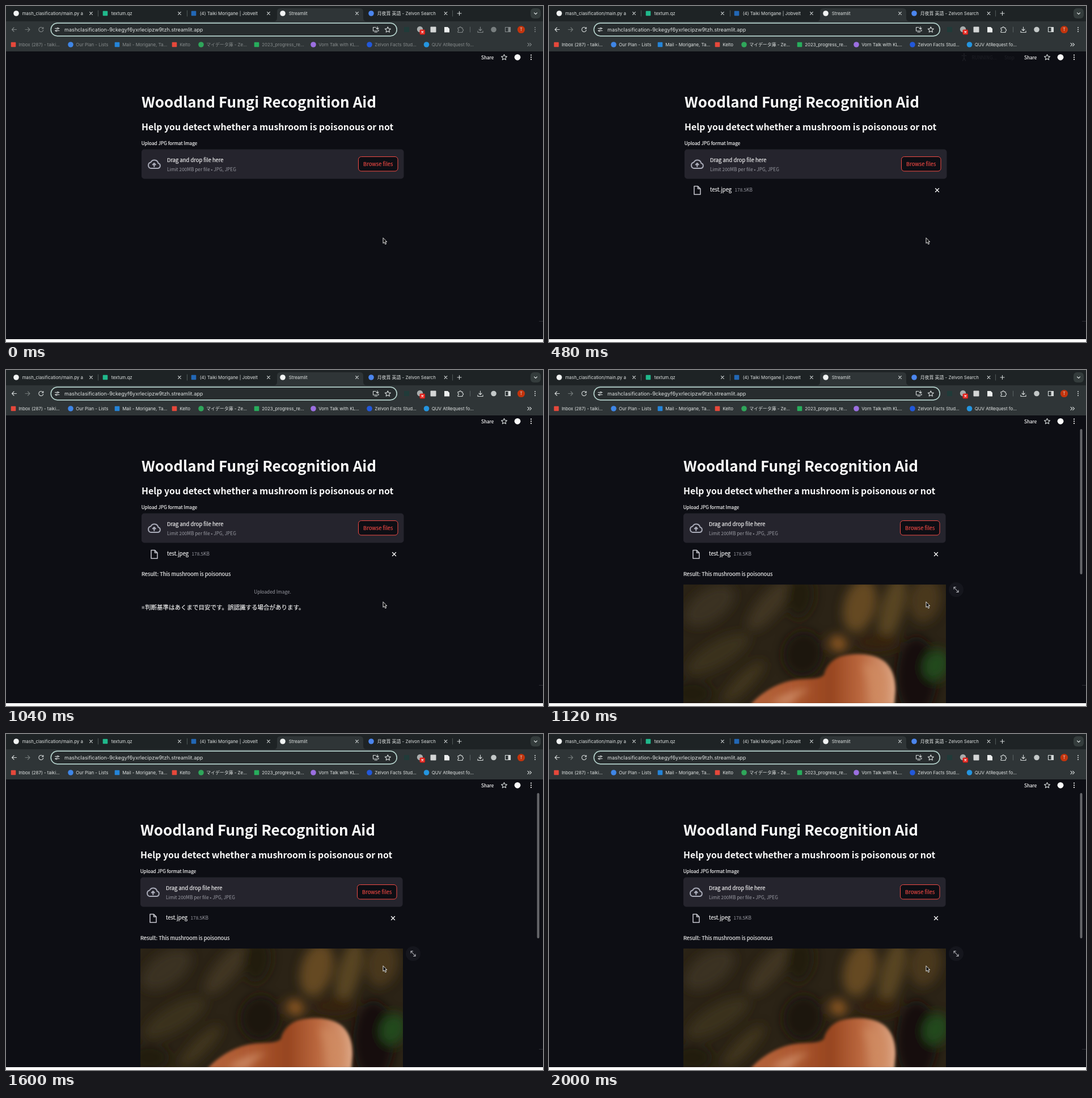
An HTML page for the animation above (2080 ms loop, 947 by 592 pixels).

```html
<!DOCTYPE html>
<html lang="en">
<head>
<meta charset="utf-8">
<title>Upload demo</title>
<style>
html, body { margin: 0; width: 100%; height: 100%; overflow: hidden; background: #fff; }
svg { display: block; }
text { white-space: pre; }
.ui { font: 7.9px Inter, "Noto Sans CJK JP", sans-serif; fill: #dfe3e2; }
.page { font: 9.4px "Noto Sans CJK JP", "Noto Sans CJK", sans-serif; fill: #fafafa; }
.page text { stroke: #fafafa; stroke-width: .15; }
.line { fill: none; stroke: #d5dada; stroke-width: 1.1; stroke-linecap: round; stroke-linejoin: round; }
.small { font-size: 8.24px; }
.page .grey { fill: #9a9ba3; stroke: none; }
.page .bold { font-weight: 700; stroke: none; }
.page .red { fill: #f04a45; stroke: #f04a45; }
</style>
</head>
<body>
<svg width="947" height="592" viewBox="0 0 947 592">
  <defs>
    <clipPath id="photoBox"><rect x="239" y="378" width="463" height="209"/></clipPath>
    <filter id="soft" x="-60%" y="-60%" width="220%" height="220%"><feGaussianBlur stdDeviation="9"/></filter>
    <filter id="edge"><feGaussianBlur stdDeviation="2.5"/></filter>
    <filter id="glow" x="-40%" y="-40%" width="180%" height="180%"><feGaussianBlur stdDeviation="7"/></filter>
    <linearGradient id="cap">
      <stop offset="0" stop-color="#b4643c"/>
      <stop offset=".3" stop-color="#ac572f"/>
      <stop offset=".55" stop-color="#97451f"/>
      <stop offset=".75" stop-color="#b9663d"/>
      <stop offset="1" stop-color="#dda684"/>
    </linearGradient>
  </defs>

  <!-- browser frame -->
  <rect width="947" height="80" fill="#1e2325"/>
  <path d="M472 27q6 0 6-6v-11q0-6 6-6h140q6 0 6 6v11q0 6 6 6z" fill="#2f3537"/>
  <rect y="27" width="947" height="53" fill="#2f3537"/>
  <g id="tabs" class="ui"></g>
  <path class="line" d="M162.500 8v10M319.500 8v10M787.500 8v10" style="stroke:#4d5656"/>
  <path class="line" d="M796 13h7M799.500 9.500v7"/>
  <rect x="925" y="4" width="18" height="18" rx="6" fill="#343c3c"/>
  <path class="line" d="M931.500 12l2.500 2.500 2.500-2.500"/>

  <rect x="79.200" y="30.200" width="610" height="22.600" rx="11.300" fill="#272c2e" stroke="#b3d0ca" stroke-width="1.700"/>
  <g class="line">
    <path d="M86.500 39.500h3M93 39.500h1M86.500 43.500h1M91 43.500h3"/>
    <circle cx="91.300" cy="39.500" r="1.300"/><circle cx="88.800" cy="43.500" r="1.300"/>
    <path d="M652 37.500h-4.500v6.500h9.500v-2M650 46h4.500M655 36.500v4M653 39l2 2 2-2"/>
    <path id="star" d="M673.300 36.700l1.500 3.200 3.500.400-2.600 2.400.700 3.400-3.100-1.700-3.100 1.700.700-3.400-2.600-2.400 3.500-.400z"/>
    <path d="M34 41.500h8M38.500 38l3.500 3.500-3.500 3.500" style="stroke:#727979"/>
  </g>
  <text class="ui" x="103" y="44.800" style="font-size:9.150px">mashclasification-9ckegyf6yxrlecipzw9tzh.streamlit.app</text>

  <rect x="702" y="37" width="9" height="9" fill="#203b39"/>
  <circle cx="730" cy="41" r="5.200" fill="#a9adad"/>
  <rect x="729.500" y="41.500" width="9.500" height="9" rx="2" fill="#e0231c"/>
  <path class="line" d="M732.800 44.500l3 3M735.800 44.500l-3 3" style="stroke:#fff"/>
  <rect x="748.500" y="36.500" width="10" height="10" rx="1" fill="#d4d6d6"/>
  <path d="M773 37h6l3 3v6.500h-9z" fill="#eceeee"/>
  <path class="line" d="M818.500 37v9" style="stroke:#596262"/>
  <circle cx="908.500" cy="41.500" r="6.600" fill="#c3340d"/>
  <text class="ui" x="908.500" y="44" text-anchor="middle" style="font-size:7px">T</text>

  <g id="active">
    <g class="line">
      <path d="M18.500 41.500h-8M14 38l-3.500 3.500 3.500 3.500"/>
      <path d="M65.300 39.500a4 4 0 1 0 .400 3M65.800 37.500v2.500h-2.500"/>
      <path d="M797 38.500h2.500a1.600 1.600 0 0 1 3.200 0h2.300v2.500a1.600 1.600 0 0 1 0 3.200v2.300h-8v-2.500a1.500 1.500 0 0 0 0-3z"/>
      <path d="M836.500 37v6M834 41l2.500 2.500 2.500-2.500M832 44v2.500h9v-2.500"/>
      <rect x="880.500" y="37.500" width="9" height="8"/>
    </g>
    <rect x="885.500" y="37.500" width="4" height="8" fill="#d5dada"/>
    <circle cx="860" cy="41.500" r="4.800" fill="#c3c8c8"/>
    <g fill="#d5dada"><circle cx="933" cy="38" r="1"/><circle cx="933" cy="41.500" r="1"/><circle cx="933" cy="45" r="1"/></g>
    <g id="marks" class="ui"></g>
    <path class="line" d="M920 65.300l2.700 2.700-2.700 2.700M923.700 65.300l2.700 2.700-2.700 2.700"/>
  </g>
  <g id="markIcons"></g>

  <!-- page -->
  <rect y="80" width="947" height="507" fill="#0d0e14"/>
  <g class="page">
    <text class="small" x="838" y="93.500">Share</text>
    <use href="#star" class="line" transform="translate(205.200 48.700)"/>
    <circle cx="902" cy="90.300" r="5.400"/>
    <circle cx="926" cy="86.500" r="1.100"/><circle cx="926" cy="90.300" r="1.100"/><circle cx="926" cy="94.100" r="1.100"/>
    <g id="running">
      <g class="line" style="stroke:#a5a6ad"><path d="M728 87.500h8M732 87.500v4l-2.500 5M732 91.500l2.500 5"/><circle cx="732" cy="84.700" r=".700"/></g>
      <text class="small grey" x="745.500" y="93.500">RUNNING...</text>
      <text class="small grey" x="803" y="93.500">Stop</text>
    </g>
  </g>
  <path d="M940 555.500h7" stroke="#2d2e34"/>

  <g id="column" class="page">
    <text class="bold" x="239" y="178.500" style="font-size:26px">Woodland Fungi Recognition Aid</text>
    <text class="bold" x="239" y="218.700" style="font-size:15.850px">Help you detect whether a mushroom is poisonous or not</text>
    <text class="small" x="238.700" y="245">Upload JPG format Image</text>
    <rect x="239" y="252.500" width="462.500" height="52" rx="5" fill="#25242d"/>
    <g class="line" style="stroke:#a9abb8;stroke-width:2">
      <path d="M255.500 286a5.300 5.300 0 0 1-.300-10.400 7 7 0 0 1 13.200 1.400 4.600 4.600 0 0 1-.400 9z"/>
      <path d="M261.300 283v-4M258.800 279.500l2.500-2.500 2.500 2.500z"/>
    </g>
    <text x="284" y="274.800">Drag and drop file here</text>
    <text class="small grey" x="284" y="291.200">Limit 200MB per file • JPG, JPEG</text>
    <rect x="621.500" y="265.500" width="69.500" height="25.500" rx="5" fill="#0d0e14" stroke="#f04a45"/>
    <text class="red" x="656.200" y="281.700" text-anchor="middle">Browse files</text>

    <g id="file">
      <path class="line" d="M256 317.500h6.500l4.500 4.500v10h-11zM262.500 317.500v4.500h4.500" style="stroke:#c7c8cf;stroke-width:1.500"/>
      <text x="284" y="327.300">test.jpeg</text>
      <text class="small grey" x="327.500" y="327.300">178.5KB</text>
      <path class="line" d="M681.500 321.500l6 6M687.500 321.500l-6 6" style="stroke:#fafafa;stroke-width:1.400"/>
    </g>
    <g id="result">
      <text x="239" y="362.500">Result: This mushroom is poisonous</text>
      <g id="caption">
        <text class="small grey" x="470" y="394" text-anchor="middle">Uploaded Image.</text>
        <text x="238.500" y="420.500" style="font-size:6.500px">※</text>
        <text x="245" y="421.700" style="font-size:10.500px">判断基準はあくまで目安です。誤認識する場合があります。</text>
      </g>
    </g>
    <g id="photo">
      <g clip-path="url(#photoBox)">
        <rect x="239" y="378" width="463" height="209" fill="#2b2316"/>
        <g id="blots" filter="url(#soft)"></g>
        <path d="M357 590C374 571 398 554 430 547C456 542 478 547 487 537C490 524 500 509 519 504C540 498 572 499 590 511C607 522 614 544 613 566L611 590z" fill="url(#cap)" filter="url(#edge)"/>
        <g filter="url(#glow)">
          <path d="M555 520C576 516 590 524 596 540C600 552 598 572 596 590H570C568 562 564 540 555 520z" fill="#d08a62" opacity=".7"/>
          <path d="M392 590C410 572 436 562 464 562C446 570 434 578 428 590z" fill="#d0906c" opacity=".8"/>
        </g>
      </g>
      <circle cx="720" cy="387" r="13" fill="#15161d"/>
      <path class="line" d="M716 386v-3.500h3.500M716.500 383l7 8M724 388v3.500h-3.500" style="stroke:#b5b6bc"/>
    </g>
  </g>
  <rect id="scrollbar" x="936.500" y="104" width="4" height="256" rx="2" fill="#66676b"/>
  <rect y="587" width="947" height="5" fill="#fff"/>
  <path d="M665 408.500v9.700l2.200-2 1.700 3.700 1.700-.800-1.700-3.600h2.800z" fill="#050505" stroke="#fff" stroke-width=".9"/>
</svg>
<script>
const LOOP = 2080;
const $ = id => document.getElementById(id);

function add(parent, tag, attrs, text) {
  const el = document.createElementNS('http://www.w3.org/2000/svg', tag);
  for (const k in attrs) el.setAttribute(k, attrs[k]);
  if (text) el.textContent = text;
  return $(parent).appendChild(el);
}

function icon(parent, x, y, color, round) {
  if (round) add(parent, 'circle', { cx: x, cy: y, r: 4.8, fill: color });
  else add(parent, 'rect', { x: x - 4.3, y: y - 4.3, width: 8.6, height: 8.6, rx: 1, fill: color });
}

// icon x, colour, round, label, close button x
[
  [18, '#f2f4f4', 1, 'mash_clasification/main.py a', 150],
  [175, '#20b98c', 0, 'textum.qz', 306],
  [331, '#2267b5', 0, '(4) Taiki Morigane | Jobvelt', 463],
  [488, '#f2f4f4', 1, 'Streamlit', 619],
  [644, '#4b86ee', 1, '月夜茸 英語 - Zelvon Search', 775.5]
].forEach(([x, color, round, label, close]) => {
  icon('tabs', x, 13, color, round);
  add('tabs', 'text', { x: x + 10.7, y: 16 }, label);
  add('tabs', 'path', { class: 'line', d: `M${close - 2.3} 10.7l4.6 4.6m0-4.6l-4.6 4.6` });
});

// icon x, colour, round, label
[
  [13, '#e5483b', 0, 'Inbox (287) - taiki...'],
  [114, '#3f86e6', 1, 'Our Plan - Lists'],
  [196, '#2484d8', 0, 'Mail - Morigane, Ta...'],
  [297, '#e5483b', 0, 'Kelto'],
  [344, '#2fa65a', 1, 'マイデータ庫 - Ze...'],
  [442, '#27ad5c', 0, '2023_progress_re...'],
  [542, '#9b6fe0', 1, 'Vorn Talk with KL...'],
  [641, '#2258da', 1, 'Zelvon Facts Stud...'],
  [741.5, '#2495e0', 1, 'QUV AtRequest fo...']
].forEach(([x, color, round, label]) => {
  icon('markIcons', x, 68, color, round);
  add('marks', 'text', { x: x + 9.2, y: 70.8 }, label);
});

// soft bark tones: x, y, rx, ry, tilt, colour
[
  [285, 415, 50, 28, -35, '#3a3221'], [390, 415, 55, 20, -50, '#3f3622'],
  [300, 500, 62, 22, -30, '#3a311d'], [345, 550, 50, 14, -45, '#40361f'],
  [445, 400, 24, 38, 10, '#221a0e'], [450, 500, 35, 40, 10, '#1b140b'],
  [255, 570, 35, 24, 0, '#231d11'], [550, 415, 28, 48, 15, '#654a23'],
  [607, 420, 20, 60, 15, '#594524'], [665, 405, 28, 40, 10, '#49391c'],
  [512, 482, 16, 14, 30, '#8a5724'], [580, 480, 40, 16, 0, '#34240f'],
  [650, 540, 36, 70, 0, '#171109'], [685, 520, 22, 28, 20, '#22481a']
].forEach(([cx, cy, rx, ry, tilt, fill]) =>
  add('blots', 'ellipse', { cx, cy, rx, ry, fill, transform: `rotate(${tilt} ${cx} ${cy})` }));

// holds each [ms, value] until the next step
function play(id, prop, steps) {
  const frames = steps.map(([ms, v]) => ({ offset: ms / LOOP, [prop]: v, easing: 'steps(1, end)' }));
  frames.push({ offset: 1, [prop]: steps[steps.length - 1][1] });
  $(id).animate(frames, { duration: LOOP, iterations: Infinity }).startTime = 0;
}

play('active', 'opacity', [[0, .5], [80, 1]]);
play('file', 'opacity', [[0, 0], [80, 1]]);
play('running', 'opacity', [[0, 0], [480, .12], [560, .5], [640, .6], [800, .3], [880, .1], [960, 0]]);
play('result', 'opacity', [[0, 0], [800, 1]]);
play('caption', 'opacity', [[0, 1], [1120, 0]]);
play('photo', 'opacity', [[0, 0], [1120, 1]]);
play('scrollbar', 'opacity', [[0, 0], [1120, 1]]);
play('column', 'transform', [[0, 'translate(0px, 0px)'], [1120, 'translate(-2px, 0px)']]);
</script>
</body>
</html>
```
